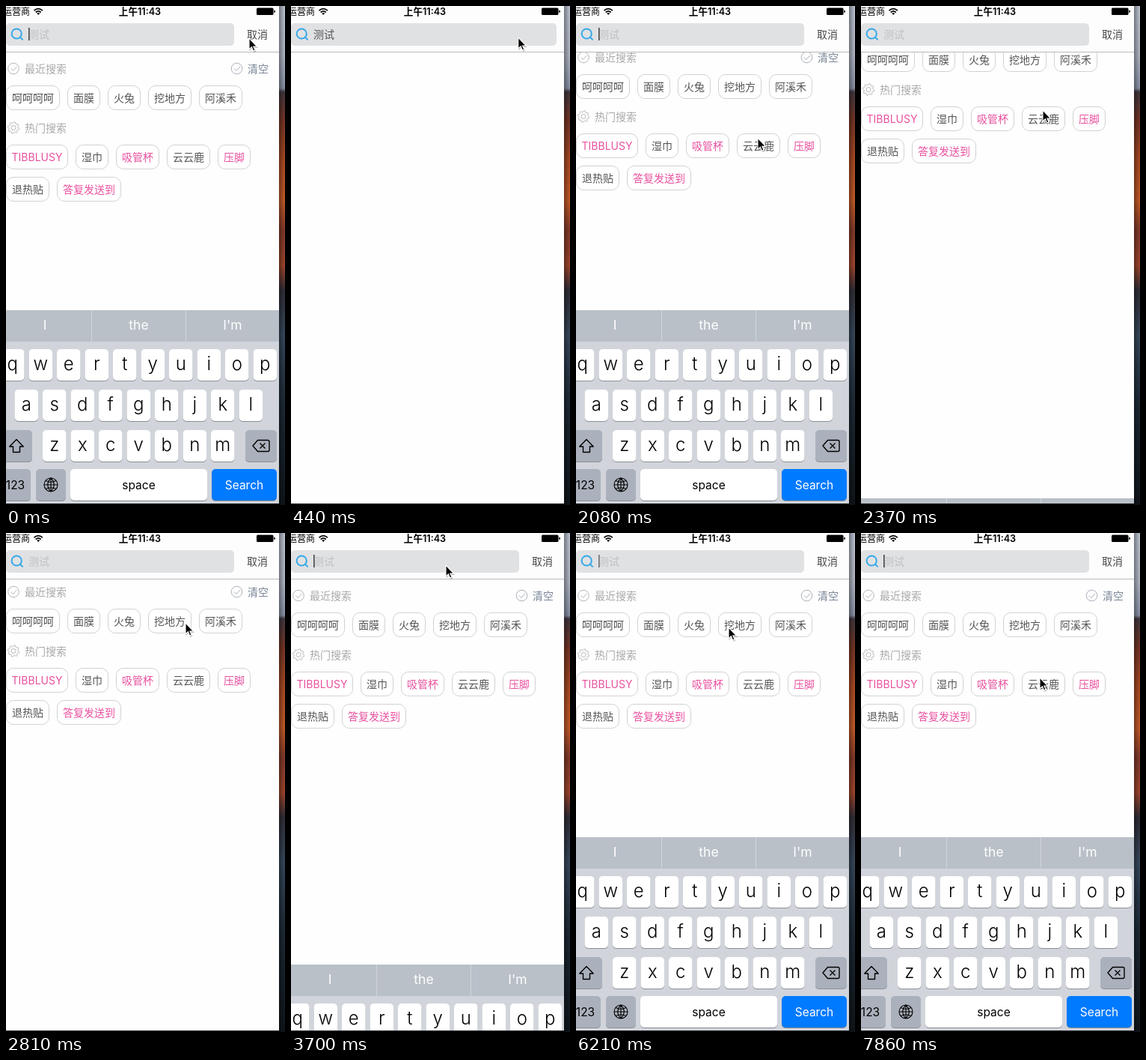
Animation of 373x666 px, one loop 8000 ms. Source, as an HTML page:

```html
<!DOCTYPE html>
<html lang="zh">
<head>
<meta charset="utf-8">
<title>Search panel</title>
<style>
  html, body { margin: 0; width: 100%; height: 100%; overflow: hidden; background: #fff; }
  svg { display: block; width: 373px; height: 666px; }
  text { font: 14px Inter, "Noto Sans CJK SC", "Noto Sans CJK", sans-serif; fill: #555; }
  .mid { text-anchor: middle; }
  .status { font-size: 12px; font-weight: 500; fill: #000; }
  .clock { font-size: 12.6px; font-weight: 600; }
  .head { fill: #a8a8a8; }
  .hot { fill: #e8509e; }
  .tag { fill: #fff; stroke: #d2d2d2; }
  .icon { fill: none; stroke: #b9b9b9; }
  .letter { font-size: 24px; font-weight: 300; fill: #000; }
  .label { font-size: 15.5px; fill: #000; }
  .light { fill: #fff; }
  .hint { font-size: 17.5px; fill: #fff; }
  .glyph { fill: none; stroke: #000; stroke-width: 1.4; stroke-linejoin: round; }
</style>
</head>
<body>
<svg viewBox="0 0 373 666">
  <defs>
    <linearGradient id="sky" x2="0" y2="1">
      <stop offset="0" stop-color="#c6cedd"/>
      <stop offset=".1" stop-color="#b9bfce"/>
      <stop offset=".165" stop-color="#8f99af"/>
      <stop offset=".172" stop-color="#453a42"/>
      <stop offset=".23" stop-color="#7d3827"/>
      <stop offset=".31" stop-color="#b44f26"/>
      <stop offset=".39" stop-color="#cd602b"/>
      <stop offset=".45" stop-color="#8a3d2c"/>
      <stop offset=".52" stop-color="#a94a2f"/>
      <stop offset=".57" stop-color="#33303a"/>
      <stop offset=".66" stop-color="#3a4d62"/>
      <stop offset=".8" stop-color="#1e2c39"/>
      <stop offset="1" stop-color="#10171c"/>
    </linearGradient>
    <linearGradient id="edge">
      <stop offset="0" stop-opacity=".42"/>
      <stop offset="1" stop-opacity=".04"/>
    </linearGradient>
    <clipPath id="screen"><path d="M0 0H365V664H0Z"/></clipPath>
  </defs>

  <path fill="url(#sky)" d="M0 0H373V666H0Z"/>
  <path fill="url(#edge)" d="M365 0H373V666H365Z"/>
  <path fill="#0c1014" d="M0 664H365V666H0Z"/>

  <g clip-path="url(#screen)">
    <path fill="#fefefe" d="M0 0H365V664H0Z"/>
    <g id="panel"><g id="list"></g></g>

    <path fill="#fdfdfd" d="M0 0H365V61H0Z"/>
    <path fill="#bababa" d="M0 61H365V62H0Z"/>
    <text class="status" x="-4" y="12">运营商</text>
    <g fill="none" stroke="#000" stroke-width="1.7">
      <path d="M37.5 6.2Q43.2 1 48.9 6.2M39.7 8.5Q43.2 5.4 46.7 8.5"/>
      <path fill="#000" stroke="none" d="M41.2 9.7Q43.2 8.2 45.2 9.7L43.2 12Z"/>
    </g>
    <text class="status clock mid" x="179" y="12">上午11:43</text>
    <rect x="335" y="2.5" width="22.5" height="9.5" rx="1.5"/>
    <path d="M358.3 5.5Q360 5.7 360 7.2T358.3 9Z"/>

    <rect id="field" y="23" width="305" height="30" rx="5" fill="#e0e1e3"/>
    <g fill="none" stroke="#37a9e8" stroke-width="2">
      <circle cx="14.2" cy="37" r="6.6"/><path d="M19 41.8L22.6 45.4"/>
    </g>
    <text id="hint" x="30" y="43">测试</text>
    <path id="caret" fill="#484848" d="M30 29H31.6V46H30Z"/>
    <text id="cancel" x="322" y="43" style="fill:#484848">取消</text>

    <g id="keys"></g>
  </g>

  <g id="mouse">
    <path opacity=".25" transform="translate(.8 1.4)" stroke="#000" d="M0 0V15L3.4 11.8 5.6 17 8 16 5.8 11H10.6Z"/>
    <path stroke="#fff" stroke-width="1.1" d="M0 0V15L3.4 11.8 5.6 17 8 16 5.8 11H10.6Z"/>
  </g>
</svg>

<script>
const $ = id => document.getElementById(id);

function add(parent, tag, attrs, text) {
  const el = document.createElementNS("http://www.w3.org/2000/svg", tag);
  for (const name in attrs) el.setAttribute(name, attrs[name]);
  if (text) el.textContent = text;
  parent.append(el);
}

// Search panel
const list = $("list");

function tagRow(y, tags) {
  let x = 0;
  for (const [word, width, hot] of tags) {
    add(list, "rect", { class: "tag", x: x + .5, y: y + .5, width: width - 1, height: 32, rx: 9.5 });
    add(list, "text", { class: hot ? "mid hot" : "mid", x: x + width / 2, y: y + 22 }, word);
    x += width + 10;
  }
}

function checkMark(x, y, color) {
  add(list, "circle", { class: "icon", cx: x, cy: y, r: 7.3, style: `stroke:${color}` });
  add(list, "path", { class: "icon", d: `M${x - 3.6} ${y}l3 3 5-5.6`, style: `stroke:${color}` });
}

function gear(x, y) {
  const points = [];
  for (let i = 0; i < 32; i++) {
    const r = i % 4 < 2 ? 7.8 : 6, a = (i + .5) * Math.PI / 16;
    points.push(`${(x + r * Math.cos(a)).toFixed(1)},${(y + r * Math.sin(a)).toFixed(1)}`);
  }
  add(list, "polygon", { class: "icon", points: points.join(" ") });
  add(list, "circle", { class: "icon", cx: x, cy: y, r: 3 });
}

checkMark(10, 83.5, "#b5b5b5");
add(list, "text", { class: "head", x: 25, y: 89 }, "最近搜索");
checkMark(308.5, 83.5, "#a9afb8");
add(list, "text", { x: 323, y: 89, style: "fill:#788496" }, "清空");
tagRow(106, [["呵呵呵呵", 72], ["面膜", 44], ["火兔", 44], ["挖地方", 58], ["阿溪禾", 58]]);
gear(10, 162.5);
add(list, "text", { class: "head", x: 25, y: 168 }, "热门搜索");
tagRow(185, [["TIBBLUSY", 83, 1], ["湿巾", 44], ["吸管杯", 58, 1], ["云云鹿", 58], ["压脚", 44, 1]]);
tagRow(228, [["退热贴", 58], ["答复发送到", 86, 1]]);

// Keyboard
const keys = $("keys"), GRAY = "#abb1bc";

function key(x, y, width, fill, label, cls = "label") {
  add(keys, "rect", { x, y: y + 1, width, height: 42, rx: 5, fill: "#8b8f96" });
  add(keys, "rect", { x, y, width, height: 42, rx: 5, fill });
  const base = y + (cls === "letter" ? 28 : 26.5);
  if (label) add(keys, "text", { class: cls + " mid", x: x + width / 2, y: base }, label);
}

add(keys, "path", { fill: "#d1d5db", d: "M0 448H365V666H0Z" });
add(keys, "path", { fill: "#b9c0c8", d: "M0 406H365V448H0Z" });
add(keys, "path", { fill: "#d0d5da", d: "M114 406h1v42h-1ZM240 406h1v42h-1Z" });
["I", "the", "I'm"].forEach((word, i) =>
  add(keys, "text", { class: "hint mid", x: 52 + i * 125.5, y: 432 }, word));
[["qwertyuiop", -7], ["asdfghjkl", 11.5], ["zxcvbnm", 49]].forEach(([row, x], r) =>
  [...row].forEach((c, i) => key(x + i * 37.5, 458 + r * 54, 31.5, "#fff", c, "letter")));
key(-8, 566, 43, GRAY);
key(320, 566, 42, GRAY);
key(-8, 618, 41, GRAY, "123");
key(40, 618, 40, GRAY);
key(86, 618, 183, "#fff", "space");
key(275, 618, 87, "#007aff", "Search", "label light");
add(keys, "path", { class: "glyph", d: "M14 578.5L4.8 588H9.5V595.5H18.5V588H23.2Z" });
add(keys, "path", { class: "glyph", d: "M336.5 579.5H350Q352 579.5 352 581.5V592.5Q352 594.5 350 594.5H336.5L330 587ZM339.5 583.5l7 7m0-7l-7 7" });
add(keys, "path", { class: "glyph", style: "stroke-width:1.1",
  d: "M51 639a9 9 0 1 0 18 0a9 9 0 1 0-18 0H69M60 630V648M60 630Q51.5 639 60 648Q68.5 639 60 630M53 633.5Q60 637 67 633.5M53 644.5Q60 641 67 644.5" });

// Motion: the picture is held for one tick, keys are [tick, value...]
const LOOP = 8000, TICK = LOOP / 54;
const openKeys = [[0, 1], [1, .9], [3, 0], [9, 0], [10, .5], [11, 1]];
const dropKeys = [[0, 0], [1, 40], [2, 220], [3, 260], [9, 260], [10, 180], [11, 30], [12, 0],
  [14, 0], [15, 130], [16, 251], [17, 260], [24, 260], [25, 170], [26, 35], [27, 0]];
const scrollKeys = [[13, 0], [14, -15], [16, -51], [17, -51], [18, -20], [19, -5], [20, 0]];
const mouseKeys = [[0, 325, 43], [2, 325, 43], [6, 240, 39], [8, 240, 39], [9, 234, 38], [11, 234, 38],
  [13, 243, 195], [16, 243, 139], [17, 243, 132], [19, 240, 120], [23, 207, 43], [26, 207, 43],
  [28, 116, 110], [30, 112, 114], [32, 112, 118], [37, 156, 122], [38, 156, 122], [42, 204, 126],
  [46, 241, 123], [49, 283, 123], [50, 283, 123], [53, 239, 193]];

function at(track, k) {
  const i = track.findIndex(p => p[0] > k);
  if (i === 0) return track[0].slice(1);
  if (i < 0) return track[track.length - 1].slice(1);
  const a = track[i - 1], b = track[i], f = (k - a[0]) / (b[0] - a[0]);
  return a.slice(1).map((v, j) => v + (b[j + 1] - v) * f);
}

function caretAlpha(k) {
  if (k < 25) return k < 1 || (k > 10 && k < 15) ? 1 : 0;
  const p = (k - 25) * TICK / 1000 % 1;
  if (p < .48) return 1;
  if (p < .62) return (.62 - p) / .14;
  return p < .86 ? 0 : (p - .86) / .14;
}

function draw(now) {
  const k = Math.floor(now % LOOP / TICK + .1) % 54;
  const [open] = at(openKeys, k), [drop] = at(dropKeys, k), [scroll] = at(scrollKeys, k);
  const [mx, my] = at(mouseKeys, k);
  const gray = Math.round(85 + 107 * open);
  $("panel").style.opacity = open;
  $("list").setAttribute("transform", `translate(0 ${scroll})`);
  $("field").setAttribute("width", 355 - 50 * open);
  $("hint").style.fill = `rgb(${gray},${gray},${gray + 3})`;
  $("cancel").setAttribute("x", 372 - 50 * open);
  $("cancel").style.opacity = open;
  $("caret").style.opacity = caretAlpha(k);
  $("keys").setAttribute("transform", `translate(0 ${drop})`);
  $("mouse").setAttribute("transform", `translate(${mx} ${my})`);
}

function loop() {
  draw(performance.now());
  requestAnimationFrame(loop);
}
loop();
</script>
</body>
</html>
```
